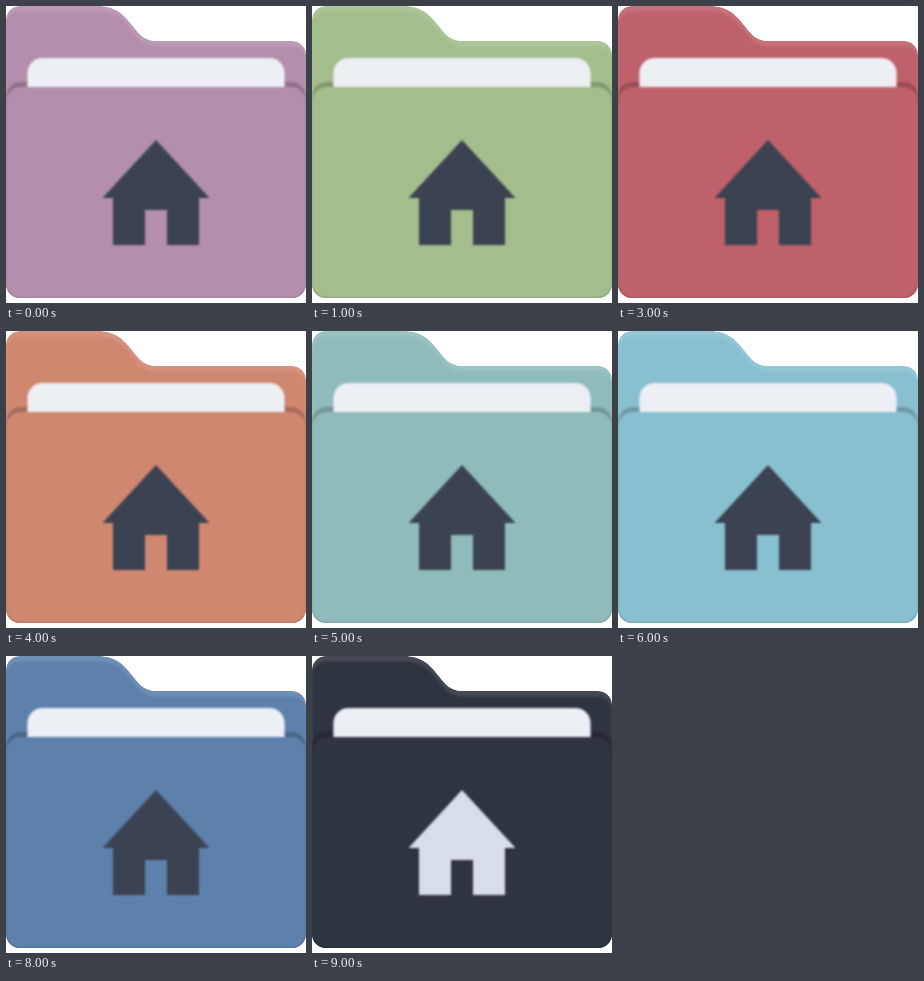
These frames come from a looping animation (300x297 px, 10 s). An HTML page:

```html
<!DOCTYPE html>
<html lang="en">
<head>
<meta charset="utf-8">
<title>Folder colours</title>
<style>
  html, body { margin: 0; width: 100%; height: 100%; overflow: hidden; background: #fff; }
  svg { display: block; width: 100%; height: 100%; }
</style>
</head>
<body>
<svg id="folder" viewBox="0 0 300 297" color="#b48ead">
  <defs>
    <path id="outline" d="M0 14A14 14 0 0 1 14 0H92C110 0 118 9 126 19C133 28 138 35 151 35H286A14 14 0 0 1 300 49V278A14 14 0 0 1 286 292H14A14 14 0 0 1 0 278Z"/>
    <clipPath id="clip"><use href="#outline"/></clipPath>
    <filter id="soft" color-interpolation-filters="sRGB"><feGaussianBlur stdDeviation="1.3"/></filter>
  </defs>
  <g clip-path="url(#clip)">
    <use href="#outline" fill="currentColor"/>
    <use href="#outline" fill="#fff" opacity=".1"/>
    <use href="#outline" y="5.4" fill="currentColor" filter="url(#soft)"/>
    <rect y="76" width="300" height="230" rx="15" opacity=".2" filter="url(#soft)"/>
    <rect x="21.4" y="52" width="257.2" height="118" rx="15" fill="#eceff4" filter="url(#soft)"/>
    <rect y="81" width="300" height="210.800" rx="15" fill="currentColor" filter="url(#soft)"/>
    <path id="house" d="M150 134L203.500 192H193V239H161V204H139V239H107V192H96.500Z" fill="#3b4252" filter="url(#soft)"/>
  </g>
</svg>
<script>
  const STEP = 1000;
  const DARK = '#2e3440';
  const colours = [
    '#b48ead', '#a3be8c', '#ebcb8b', '#bf616a', '#d08770',
    '#8fbcbb', '#88c0d0', '#81a1c1', '#5e81ac', DARK
  ];
  const folder = document.getElementById('folder');
  const house = document.getElementById('house');
  const start = performance.now();

  function draw(ms) {
    const colour = colours[Math.floor(ms / STEP) % colours.length];
    folder.setAttribute('color', colour);
    house.setAttribute('fill', colour === DARK ? '#d8dee9' : '#3b4252');
  }

  function tick() {
    draw(performance.now() - start);
    requestAnimationFrame(tick);
  }
  tick();
</script>
</body>
</html>
```
